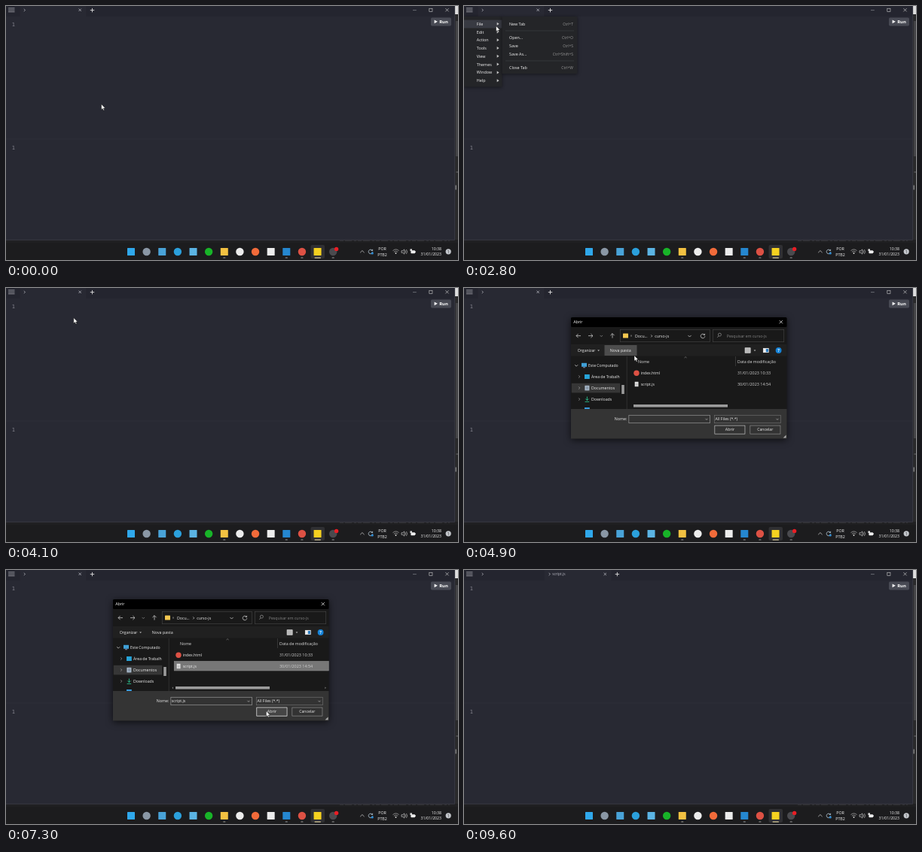
Recreate the animation shown at these times as an HTML page. Size 600x338 px, loop 10 s.

```html
<!DOCTYPE html>
<html lang="pt-BR">
<head>
<meta charset="utf-8">
<title>Abrir arquivo</title>
<style>
  html, body { margin: 0; width: 100%; height: 100%; overflow: hidden; background: #1c1c1e; }
  svg { display: block; width: 600px; height: 338px; }
  text { font-family: "Open Sans", "Noto Sans", sans-serif; white-space: pre; }
  .mono { font-family: "DejaVu Sans Mono", monospace; }
</style>
</head>
<body>
<svg id="stage" viewBox="0 0 600 338"></svg>
<script>
const rect = (x, y, w, h, fill, extra = '') =>
  `<rect x="${x}" y="${y}" width="${w}" height="${h}" fill="${fill}" ${extra}/>`;
const box = (x, y, w, h, fill, stroke, r = 0) =>
  rect(x + .25, y + .25, w - .5, h - .5, fill, `stroke="${stroke}" stroke-width=".6" rx="${r}"`);
const disc = (x, y, r, fill) => `<circle cx="${x}" cy="${y}" r="${r}" fill="${fill}"/>`;
const line = (d, color = '#ddd', w = .7, extra = '') =>
  `<path d="${d}" fill="none" stroke="${color}" stroke-width="${w}" ${extra}/>`;
const fill = (d, color) => `<path d="${d}" fill="${color}"/>`;
// y is the vertical middle of the text
const text = (x, y, s, color = '#eee', size = 5.25, extra = '') =>
  `<text x="${x}" y="${(y + size * .36).toFixed(2)}" fill="${color}" font-size="${size}" ${extra}>${s}</text>`;
const group = (id, body) => `<g id="${id}">${body}</g>`;

const cross = (x, y, r, color) => line(`M${x - r} ${y - r}l${2 * r} ${2 * r}m0 ${-2 * r}l${-2 * r} ${2 * r}`, color);
const plus = (x, y, r) => line(`M${x - r} ${y}h${2 * r}M${x} ${y - r}v${2 * r}`, '#ddd', .9);
const down = (x, y, r = 2, color) => line(`M${x - r} ${y - r / 2}l${r} ${r}l${r} ${-r}`, color);
const next = (x, y, r = 1.6, color) => line(`M${x - r / 2} ${y - r}l${r} ${r}l${-r} ${r}`, color);
const caretDown = (x, y) => fill(`M${x - 1.4} ${y - .7}h2.8l-1.4 1.6z`, '#ccc');
const refresh = (x, y, color) =>
  line(`M${x + 2.2} ${y - 1.6}A2.8 2.8 0 1 0 ${x + 2.8} ${y + .4}M${x + 2.6} ${y - 3}v1.7h-1.8`, color);

const BG = '#282933', BAR = '#24252f';

function desktop() {
  const tray = line('M470.2 328.2l2.7 -2.7l2.7 2.7')
    + refresh(484, 326.8, '#cfe4f2') + disc(486.2, 329, 1.6, '#2f8fd8')
    + text(499.5, 323.3, 'POR', '#f2f2f2', 5.3, 'text-anchor="middle"')
    + text(499.5, 330.6, 'PTB2', '#f2f2f2', 5.3, 'text-anchor="middle"')
    + line('M513.5 325.6q4 -3.4 8 0M514.9 327.3q2.6 -2.2 5.2 0', '#bbb') + disc(517.5, 329, .9, '#ddd')
    + line('M525 325.7h1.6l2.2 -1.8v6.2l-2.2 -1.8H525z', '#e4e4e4', .6)
    + line('M530 325.2q1.4 1.8 0 3.6M531.4 324q2.4 3 0 6', '#ccc', .6)
    + rect(537.4, 325.2, 5.6, 4, '#eee', 'rx=".8"') + rect(543.2, 326.3, .8, 1.8, '#eee')
    + fill('M536.4 323.4h2.6v2.6h-2.6z', '#ddd')
    + text(578, 323.2, '10:38', '#f2f2f2', 5.2, 'text-anchor="end"')
    + text(578, 330.4, '31/01/2023', '#f2f2f2', 5.2, 'text-anchor="end"')
    + disc(587.2, 326.8, 3.6, '#c4c7cc') + text(587.2, 326.8, '1', '#222', 4.8, 'text-anchor="middle"');

  // [colour, round, running]
  const apps = [
    ['#2fa8ec'], ['#8a97a5', 1], ['#49a3d8'], ['#2ba0dc', 1], ['#5bb4e4'], ['#18b428', 1], ['#f2c142', 0, 1],
    ['#ececec', 1], ['#f26b3a', 1], ['#ececec'], ['#2587d0', 0, 1], ['#dd5144', 1, 1], ['#f5d120'], ['#4a4a4e', 1, 1]
  ];
  const dock = apps.map(([color, round, running], i) => {
    const x = 166 + i * 20.63;
    return (round ? disc(x, 327, 5.2, color) : rect(x - 5, 322, 10, 10, color, 'rx=".6"'))
      + (running ? rect(x - 1.6, 334.6, 3.2, 1, '#9a9a9a', 'rx=".5"') : '');
  }).join('');

  return rect(0, 0, 600, 338, '#1c1c1e')
    + rect(596, 0, 4, 315, '#29292b') + rect(596, 0, 4, 11, '#dedede')
    + rect(597, 20, 3, 180, '#444447') + rect(597.5, 220, 2.5, 2, '#4c4c4e')
    + rect(596.5, 238.5, 1.4, 6, '#8a8a8a')
    + rect(0, 311, 600, 4, '#202022')
    + line('M443 312.4h146', '#353639', .9, 'stroke-dasharray="5 2 9 3 3 2"')
    + rect(0, 315, 600, 23, '#1c1c1e')
    + rect(404.5, 318, 18.5, 18, '#303033', 'rx="2"')
    + dock + rect(409.5, 334.5, 8.5, 1.2, '#d6c99b', 'rx=".6"')
    + disc(438.6, 323.4, 2.7, '#e81e25') + tray;
}

function editor() {
  return rect(0, 0, 596, 311.5, BG) + rect(0, 0, 596, 14, BAR)
    + line('M595.7 0v311.3H0', '#45464f', .6)
    + rect(0, 176.6, 595, .8, '#2d2e38')
    + group('burgerHot', rect(0, 0, 18, 14, '#3a3b44'))
    + line('M3 2.9h8.5M3 5.3h8.5M3 7.7h8.5', '#b5b6bd', .8)
    + group('oneTab', rect(18.5, 0, 88, 14, BG) + plus(114.5, 5.6, 2.7))
    + group('twoTabs', rect(107, 0, 88.5, 14, BG) + next(113.5, 5.5, 1.7, '#c8c9d0')
        + text(117.2, 5.6, 'script.js', '#b8b9c2', 4.9) + cross(187.3, 5.5, 1.7, '#c8c9d0') + plus(203.4, 5.6, 2.7))
    + next(24.6, 5.5, 1.7, '#c8c9d0') + group('close1', cross(98.2, 5.3, 1.7, '#c8c9d0'))
    + line('M540 5.6h4.8', '#85868e') + box(561.6, 3, 4.6, 4.6, 'none', '#ccc') + cross(585.5, 5.3, 2.1, '#ccc')
    + rect(564, 15.6, 27, 10.8, '#484a54', 'rx="1.6"') + fill('M568.6 18.4v4.8l4.2 -2.4z', '#fff')
    + text(575.2, 20.9, 'Run', '#fff', 5.9, 'font-weight="700"')
    + text(7.8, 24.6, '1', '#84858e', 7, 'class="mono"') + text(7.8, 188.6, '1', '#84858e', 7, 'class="mono"')
    + group('caret', rect(20.4, 19.5, .9, 12, '#e4e4e8'));
}

function menus() {
  const items = ['File', 'Edit', 'Action', 'Tools', 'View', 'Themes', 'Window', 'Help'];
  const sub = [['New Tab', 'Ctrl+T', 24], ['Open...', 'Ctrl+O', 42], ['Save', 'Ctrl+S', 53],
    ['Save As...', 'Ctrl+Shift+S', 64], ['Close Tab', 'Ctrl+W', 82]];
  const shade = 'style="filter:drop-shadow(0 1px 2px #0007)"';
  return group('menu', rect(0, 14, 50.5, 93.5, '#242528', shade)
      + group('fileHot', rect(0, 18.6, 50.5, 10.8, '#383a42'))
      + items.map((s, i) => {
          const y = 23.8 + i * 10.78;
          return text(16.8, y, s, '#f4f4f4', 5.4) + fill(`M43.7 ${y - 2.1}v4l2.9 -2z`, '#c4c4c4');
        }).join(''))
    + group('sub', rect(50.5, 14, 100, 76, '#242528', shade)
      + group('openHot', rect(50.5, 36.6, 100, 10.8, '#383a42'))
      + rect(55, 32.7, 91, .5, '#44454a') + rect(55, 72.7, 91, .5, '#44454a')
      + sub.map(([s, key, y]) => text(60, y, s, '#f4f4f4', 5.4)
          + text(145, y, key, '#999', 5, 'text-anchor="end"')).join(''));
}

function dialog() {
  const file = (y, name, date) => text(234.7, y, name, '#eee', 5.1) + text(363, y, date, '#d0d0d0', 5.45);
  const sheet = (x, y) => rect(x - 2.3, y - 3.2, 4.8, 6.4, '#e8e8e8')
    + line(`M${x - 1.3} ${y - 1}h2.8m-2.8 1.5h2.8m-2.8 1.5h2.8`, '#888', .5);
  const head = rect(142, 39, 286.5, 161.5, '#191919', 'rx="2" style="filter:drop-shadow(0 2px 5px #000a)"')
    + rect(142, 39, 286.5, 13, '#000', 'rx="1.5"') + text(145.2, 45.4, 'Abrir', '#fff', 5.3) + cross(420.8, 45.2, 2.1, '#fff')
    + line('M155 63.6h-6m2.6 -2.6l-2.6 2.6l2.6 2.6') + line('M165 63.6h6m-2.6 -2.6l2.6 2.6l-2.6 2.6')
    + down(182.3, 63.8, 1.7, '#999') + line('M197 66.6v-6m-2.6 2.6l2.6 -2.6l2.6 2.6')
    + box(207, 55, 119.5, 17, '#191919', '#4a4a4a') + rect(211, 60.5, 7, 6, '#f3c74f', 'rx=".5"')
    + text(220.8, 63.2, '«', '#aaa', 5) + text(227, 63.7, 'Docu...', '#eee', 5.2) + next(249, 63.9, 1.5)
    + text(253.3, 63.7, 'curso-js', '#eee', 5.2) + down(299.5, 64, 2.1) + refresh(317, 63.8, '#ddd')
    + box(330, 55, 95, 17, '#191919', '#4a4a4a') + line('M341.4 62.3a2 2 0 1 0 -1.9 1.8a2 2 0 0 0 1.9 -1.8M338.2 63.8l-2 2', '#999')
    + text(348.8, 63.7, 'Pesquisar em curso-js', '#858585', 5.2);
  const tools = rect(142, 75, 286.5, 15.5, '#202020')
    + group('newHot', rect(186.5, 76, 43, 14, '#4d4d4d'))
    + text(150.7, 83.2, 'Organizar', '#eee', 5.2) + caretDown(178.6, 83.2) + text(193.8, 83.2, 'Nova pasta', '#eee', 5.35)
    + box(372.8, 79.5, 7.6, 7, '#b8b8b8', '#eee') + caretDown(386, 83.2)
    + box(397, 80, 7.5, 6, '#eee', '#fff') + rect(400.8, 81, 3.2, 4.2, '#2f7ec0')
    + disc(417.6, 83, 3.9, '#1583d8') + text(417.6, 83, '?', '#fff', 5.6, 'text-anchor="middle" font-weight="700"');
  const tree = rect(142.8, 126.8, 64.4, 12.6, '#363636')
    + down(149.2, 103.2, 2) + rect(156, 99.8, 7, 5, '#3f9fd6') + rect(158, 105.4, 3, .8, '#aac')
    + text(165, 103.2, 'Este Computado', '#eee', 5.15)
    + [118, 133, 148].map(y => next(153, y, 1.6, '#aaa')).join('')
    + rect(160, 115, 6.8, 6, '#27a4d8') + text(169, 118, 'Área de Trabalh', '#eee', 5.15)
    + rect(160.4, 129.8, 6, 6.6, '#a8b8c8') + line('M162 132h3m-3 2h3', '#456', .6) + text(169, 133.2, 'Documentos', '#eee', 5.25)
    + line('M163.4 144.5v5m-2 -2l2 2l2 -2M160.6 151.4h5.6', '#2cc08d', .9) + text(169, 148.2, 'Downloads', '#eee', 5.25)
    + rect(160, 159, 6.8, 2, '#3a9ce0')
    + rect(209.2, 129, 3.6, 12, '#9b9b9b') + rect(215.8, 91, .7, 70, '#3a3a3a');
  const list = group('row1', rect(223, 106.6, 205.5, 13.6, '#4d4d4d')) + group('row2', rect(223, 121.2, 205.5, 13, '#4d4d4d'))
    + group('picked', box(223, 121.2, 205.5, 13, '#777', '#8e8e8e'))
    + text(231, 98, 'Nome', '#ddd', 5.25) + line('M292.5 93l1.6 -1.4l1.6 1.4', '#aaa', .5)
    + rect(360, 91, .6, 13, '#484848') + text(363, 98, 'Data de modificação', '#ddd', 5.35)
    + disc(229, 113.3, 3.7, '#dd5144') + sheet(229, 128)
    + file(113.3, 'index.html', '31/01/2023 10:33') + file(128, 'script.js', '30/01/2023 14:54')
    + rect(225, 155, 125, 3.6, '#9b9b9b')
    + group('arrows', fill('M222 155.4v2.8l-1.6 -1.4zM423.4 155.4v2.8l1.6 -1.4z', '#777'));
  const foot = rect(142, 161, 286.5, 39.5, '#343434')
    + text(216.3, 174.3, 'Nome:', '#eee', 5.3, 'text-anchor="end"')
    + box(218.6, 169, 108, 11, '#333', '#a8a8a8') + down(322, 174.6, 1.5, '#bbb')
    + group('fileName', text(219.8, 174.5, 'script.js', '#eee', 5.2))
    + box(332, 169, 88.5, 11, '#333', '#777') + text(333.6, 174.4, 'All Files (*.*)', '#eee', 5.2) + down(416, 174.6, 1.5, '#bbb')
    + box(332.6, 182.8, 40.6, 11.6, '#333', '#d8d8d8') + group('okHot', box(332.6, 182.8, 40.6, 11.6, '#454545', '#d8d8d8'))
    + text(353, 188.5, 'Abrir', '#eee', 5.3, 'text-anchor="middle"')
    + box(379.6, 182.8, 40.6, 11.6, '#333', '#999') + text(399.8, 188.5, 'Cancelar', '#eee', 5.25, 'text-anchor="middle"')
    + fill('M427.6 195.4v4h-4z', '#aaa');
  return group('dialog', head + tools + tree + list + foot);
}

const pointer = group('pointer',
  '<path d="M0 0V7.4L1.7 5.9L2.9 8.5L4.1 8L3 5.5H5.3Z" fill="#fff" stroke="#111" stroke-width=".5"/>');

document.getElementById('stage').innerHTML = desktop() + editor() + menus() + dialog() + pointer;

const parts = Object.fromEntries([...document.querySelectorAll('g[id]')].map(g => [g.id, g]));
const show = (id, on) => parts[id].style.display = on ? '' : 'none';

const LOOP = 10000, STEP = 100;
// [time, x, y] of the pointer tip
const path = [
  [0, 126.5, 130.5], [1000, 1.6, 4.6], [1500, 1.6, 4.6], [2200, 26, 23], [2300, 26, 22], [2500, 26, 22],
  [3400, 89.8, 39.6], [4600, 89.8, 39.6], [4900, 226, 89.8], [5100, 226, 89.8], [5700, 248.4, 128.3],
  [6500, 248.4, 128.3], [7200, 345.3, 187.6], [LOOP, 345.3, 187.6]
];

function tipAt(t) {
  const i = path.findIndex(p => p[0] > t);
  const [t0, x0, y0] = path[i - 1], [t1, x1, y1] = path[i];
  const p = (t - t0) / (t1 - t0), e = p * p * (3 - 2 * p);
  return [x0 + (x1 - x0) * e, y0 + (y1 - y0) * e];
}

function draw(t) {
  const [x, y] = tipAt(t);
  const during = (a, b) => t >= a && t < b;
  const over = (l, top, r, b) => x >= l && x < r && y >= top && y < b;
  const picked = t >= 6100, tabs = t >= 7900;

  parts.pointer.setAttribute('transform', `translate(${x.toFixed(2)} ${y.toFixed(2)})`);
  show('pointer', t < 8000);
  show('burgerHot', over(0, 0, 18, 14));
  show('menu', during(1200, 3600));
  show('fileHot', during(2000, 3600));
  show('sub', during(2100, 3600));
  show('openHot', over(50, 36.6, 150, 47.4));
  show('dialog', during(4700, 7600));
  show('newHot', over(186, 76, 229, 90));
  show('row1', over(223, 106.6, 428, 120.2));
  show('row2', over(223, 121.2, 428, 134.2));
  show('picked', picked);
  show('fileName', picked);
  show('arrows', picked);
  show('okHot', over(333, 183, 373, 194));
  show('oneTab', !tabs);
  show('twoTabs', tabs);
  show('close1', t < 8000);
  show('caret', during(7900, 8500) || during(9000, 9600));
}

const start = performance.now();
function tick(now) {
  const t = Math.max(0, now - start) % LOOP;
  draw(Math.floor(t / STEP) * STEP);
  requestAnimationFrame(tick);
}
draw(0);
requestAnimationFrame(tick);
</script>
</body>
</html>
```
